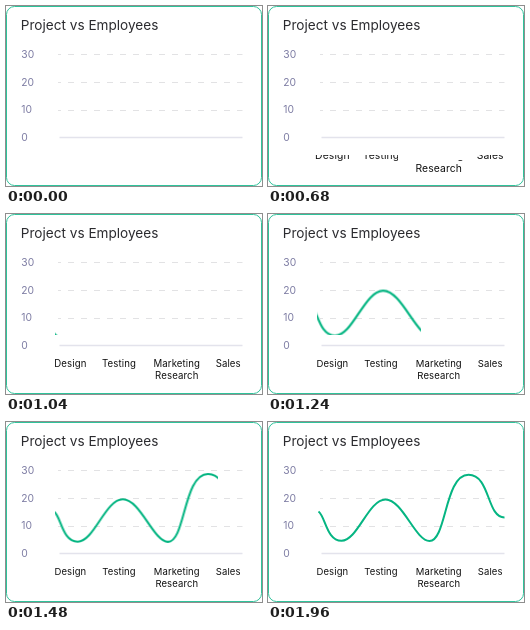
Recreate the animation shown at these times as an HTML page. Size 256 by 180 pixels, loop 2.52 s.

```html
<!DOCTYPE html>
<html lang="en">
<head>
<meta charset="utf-8">
<title>Project vs Employees</title>
<style>
  html, body { margin: 0; width: 100%; height: 100%; overflow: hidden; background: #fff; }
  .stage {
    position: absolute; left: 0; top: 0; width: 256px; height: 180px;
    overflow: hidden; font-family: Inter, sans-serif;
  }
  svg { position: absolute; left: 0; top: 0; overflow: visible; }
  .card { fill: #fff; stroke: #2fc39b; }
  .title { font-size: 13.6px; fill: #2b2b2f; }
  .scale { font-size: 10.3px; fill: #7d7ca3; }
  .grid { stroke: #e2e2e4; stroke-dasharray: 6 7; stroke-dashoffset: 3; }
  .axis { stroke: #e3e3ec; stroke-width: 1.5; }
  .curve { fill: none; stroke: #05b582; stroke-width: 2; }

  .label, .label span, .plot, .plot svg {
    animation: 2520ms cubic-bezier(.3, 0, 0, 1) infinite;
  }
  .label {
    position: absolute; top: 144px; height: 12px;
    font-size: 9.5px; line-height: 12px; letter-spacing: .1px;
    text-align: center; white-space: nowrap; color: #111;
    animation-name: label-wipe;
  }
  .label.tall { height: 24px; }
  .label span { display: block; height: 100%; margin: 0 -10px; animation-name: label-zoom; }
  .plot {
    position: absolute; left: 49.5px; top: 50.5px; width: 187px; height: 70.5px;
    animation-name: plot-wipe;
  }
  .plot svg { animation-name: plot-zoom; }

  /* labels run 425-1425 ms, the curve 985-1985 ms */
  @keyframes label-wipe {
    0%, 16.865% { clip-path: inset(100% 0 0 0); }
    56.548%, 100% { clip-path: inset(0 0 0 0); }
  }
  @keyframes label-zoom {
    0%, 16.865% { transform: scale(1.2); }
    56.548%, 100% { transform: scale(1); }
  }
  @keyframes plot-wipe {
    0%, 39.087% { clip-path: inset(0 100% 0 0); }
    78.77%, 100% { clip-path: inset(0 0 0 0); }
  }
  @keyframes plot-zoom {
    0%, 39.087% { transform: scale(1.2); }
    78.77%, 100% { transform: scale(1); }
  }
</style>
</head>
<body>
<div class="stage">
  <svg width="256" height="180" viewBox="0 0 256 180">
    <rect class="card" x=".5" y=".5" width="255" height="179" rx="8"/>
    <text class="title" x="14.8" y="24">Project vs Employees</text>
    <g class="scale">
      <text x="15.3" y="52">30</text>
      <text x="15.3" y="79.5">20</text>
      <text x="15.3" y="107.2">10</text>
      <text x="15.3" y="134.7">0</text>
    </g>
    <path class="grid" d="M52 48.5H236.5M52 76.5H236.5M52 104.5H236.5"/>
    <path class="axis" d="M53.5 131.6H236.5"/>
  </svg>

  <div class="label" style="left:47.5px;width:32.8px"><span>Design</span></div>
  <div class="label" style="left:96px;width:34px"><span>Testing</span></div>
  <div class="label tall" style="left:146.7px;width:47.6px"><span>Marketing<br>Research</span></div>
  <div class="label" style="left:209.4px;width:26.4px"><span>Sales</span></div>

  <div class="plot">
    <svg width="187" height="70.5" viewBox="49.5 50.5 187 70.5">
      <path class="curve" d="M50 89C57 94 58 118.3 73 118.3C89 118.3 100 77 117 77C134 77 147 118.5 161 118.5C178 118.5 176 52.3 200 52.3C222 52.3 218 95 236 95"/>
    </svg>
  </div>
</div>
</body>
</html>
```
